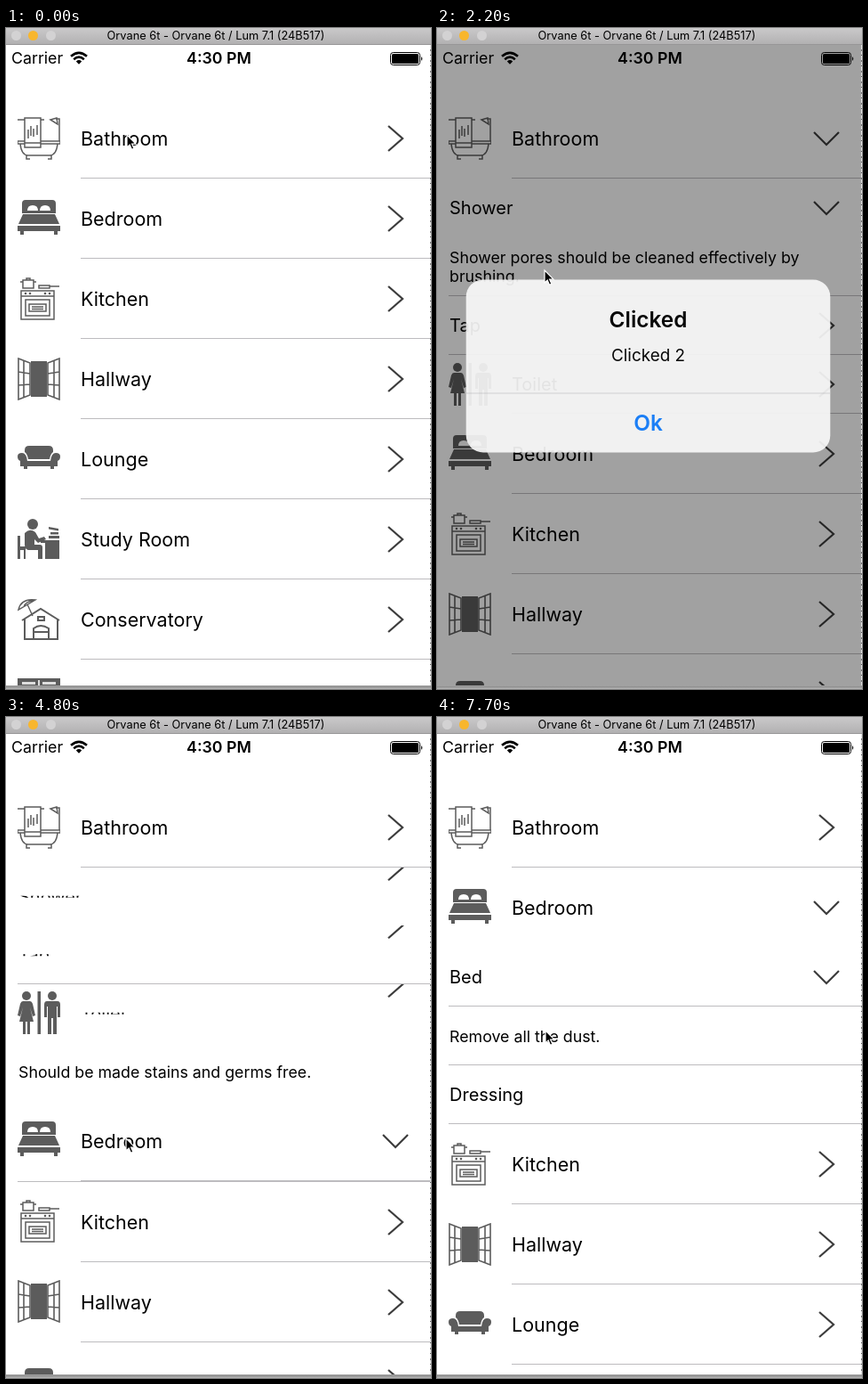
An HTML page for the animation above (8000 ms loop, 478 by 742 pixels).

```html
<!DOCTYPE html>
<html lang="en">
<head>
<meta charset="utf-8">
<title>Room list</title>
<style>
  html, body { margin: 0; width: 100%; height: 100%; overflow: hidden; background: #fff; }
  body { position: relative; font-family: Inter, "Open Sans", sans-serif; color: #000; }
  div, svg { position: absolute; }
  #stage { left: 0; top: 0; width: 478px; height: 742px; overflow: hidden; background: #fff; }
  #bar { left: 0; top: 0; width: 478px; height: 18px; background: linear-gradient(#cac9ca, #b2b1b2); border-bottom: 1px solid #979697; }
  #bar i { position: absolute; top: 2.5px; width: 11px; height: 11px; border-radius: 50%; background: #d3d2d3; }
  #bar div { left: 0; width: 472px; top: 0; line-height: 17px; text-align: center; font-size: 12.8px; white-space: pre; }
  #screen { left: 0; top: 19px; width: 477px; height: 719px; overflow: hidden; }
  #status { left: 0; top: 0; width: 477px; height: 30px; }
  #status div { line-height: 30px; font-size: 17.8px; white-space: pre; }
  .row { left: 0; width: 477px; overflow: hidden; background: #fff; }
  .body { left: 0; top: 50%; width: 477px; }
  .label { left: 84px; top: 50%; transform: translateY(-50%); line-height: 30px; font-size: 21.5px; white-space: pre; }
  .sub .label { font-size: 20px; }
  .flat .label { left: 14px; }
  .note .label { font-size: 17.8px; line-height: 21px; }
  .icon { left: 13px; top: 50%; margin-top: -24.5px; color: #5c5c5c; }
  .chev { left: 422px; top: 50%; margin-top: -16px; }
  .sep { left: 84px; right: 0; bottom: 0; height: 1px; background: #bdbcbf; }
  .flat .sep { left: 13px; }
  #dim { left: 0; top: 0; width: 477px; height: 719px; background: #000; }
  #alert { left: 35.5px; top: 264.5px; width: 403px; height: 191px; border-radius: 19px; overflow: hidden; background: rgba(249, 249, 249, .97); }
  #alert div { left: 0; width: 100%; text-align: center; line-height: 40px; }
  #edge { left: 477px; top: 19px; width: 1px; height: 720px; background: repeating-linear-gradient(#e4e4e4 0 5px, #777 5px 7px, #ddd 7px 11px, #555 11px 12px); }
  #foot { left: 0; top: 738px; width: 478px; height: 4px; background: linear-gradient(#a9a9a9, #8f8f8f 40%, #bcbcbc); }
</style>
</head>
<body>
<div id="stage">
  <div id="screen">
    <div id="list"></div>
    <div id="status">
      <div style="left:6px">Carrier</div>
      <svg style="left:72px;top:7px" width="20" height="16" viewBox="0 0 20 16">
        <g fill="none" stroke="#000" stroke-width="2.6"><path d="M1 5.8Q10 -2 19 5.8M4.2 9.2Q10 4.2 15.8 9.2"/></g>
        <path d="M6.8 11.4Q10 8.8 13.2 11.4L10 14.8Z"/>
      </svg>
      <div style="left:0;width:479px;text-align:center;font-weight:600">4:30 PM</div>
      <svg style="left:431px;top:7px" width="40" height="18" viewBox="0 0 40 18">
        <rect x="1.5" y="1.5" width="33" height="14" rx="3" fill="none" stroke="#000"/>
        <rect x="3" y="3" width="30" height="11" rx="1.5"/>
        <path d="M36 6Q38.5 8.5 36 11Z"/>
      </svg>
    </div>
    <div id="dim"></div>
    <div id="alert">
      <div style="top:24.5px;font-size:24px;font-weight:600">Clicked</div>
      <div style="top:62.5px;font-size:18.6px">Clicked 2</div>
      <div id="ok" style="top:125px;height:66px;line-height:66px;border-top:1px solid #d4d4d6;font-size:24px;font-weight:600;color:#157efb">Ok</div>
    </div>
  </div>
  <div id="bar">
    <i style="left:6px"></i><i style="left:25px;background:#f8b62d"></i><i style="left:45px"></i>
    <div>Orvane 6t - Orvane 6t / Lum 7.1 (24B517)</div>
  </div>
  <div id="edge"></div>
  <div id="foot"></div>
  <svg id="cursor" style="left:0;top:0;overflow:visible" width="12" height="18">
    <path d="M0 0V14L3.2 11.1L5.5 16.4L7.9 15.3L5.6 10.2H10Z" stroke="#fff" stroke-width="1.2"/>
  </svg>
</div>
<script>
const LOOP = 8000, TICK = 100, GROW = 350, END = 9000;
const $ = id => document.getElementById(id);

const line = (d, w = 1.7) => `<path d="${d}" fill="none" stroke="currentColor" stroke-width="${w}"/>`;
const fill = (d, c = 'currentColor') => `<path d="${d}" fill="${c}"/>`;
const dot = (x, y, r) => `<circle cx="${x}" cy="${y}" r="${r}" fill="currentColor"/>`;

const icons = {
  bath: line('M0 27H48V30H0ZM3 30C4 40 7 43 12 43H36C41 43 44 40 45 30M10 43V47H14M38 43V47H34M47 27V2H43M37 3L44 1L45 8ZM0 3H8M26 3H30', 1.5)
    + fill('M8 1H26V34H8Z', '#fff') + line('M8 1H26V34H8ZM12 14V24M15 10V21M18 13V22M22 9V20M8 29H26', 1.5),
  bed: fill('M5 18V7Q5 3 9 3H39Q43 3 43 7V18ZM6 19H42L47 30H1ZM0 32H48V38H45V42H41V38H7V42H3V38H0Z')
    + fill('M11 15Q11 9 17 9Q23 9 23 15ZM25 15Q25 9 31 9Q37 9 37 15ZM9 18H39V19H9Z', '#fff'),
  kitchen: line('M4 15H41V47H4ZM4 21H41M9 25H36V43H9ZM13 30H32V38H13ZM16 33H29M16 35.5H29M6 3H18V12H6ZM3 5H6M18 5H21M10 3V1H14V3M24 9H36V12H24ZM36 10H47', 1.5)
    + dot(9, 18, 1.3) + dot(14, 18, 1.3) + dot(31, 18, 1.3) + dot(36, 18, 1.3),
  window: fill('M15 4H33V44H15Z') + line('M1 1L14 6V42L1 47ZM7 3.5V44.5M1 16L14 18M1 31L14 30M47 1L34 6V42L47 47ZM41 3.5V44.5M47 16L34 18M47 31L34 30', 1.6),
  sofa: fill('M8 16V14Q8 9 13 9H35Q40 9 40 14V16Q37 18 36 24H12Q11 18 8 16ZM0 21Q0 17 5 17Q10 17 11 26H37Q38 17 43 17Q48 17 48 21Q48 25 45 26V32H41V35H37V32H11V35H7V32H3V26Q0 25 0 21Z'),
  study: dot(17, 7, 6) + fill('M8 17Q14 11 20 16L24 23L30 21L32 24L23 28L19 24V30H25Q28 30 28 33V46H23V36H12Q8 35 8 30ZM0 20H3V32H9V46H7V36H3V46H0ZM26 25H47V46H31V28H26ZM35 20H47V23H35ZM37 16H46V18.5H37ZM35 10L46 12V14.5L35 12.5Z'),
  house: line('M5 25L26 12L47 25M8 23V46H45V23M18 46V34Q26 28 35 34V46M18 38H35M23 21H30V25H23Z', 2)
    + line('M1 13Q4 0 20 2ZM7 10Q8 4 20 2M11 7L17 20', 1.4),
  garage: fill('M0 0H48V48H0Z') + fill('M5 4H20V7H5ZM28 4H43V7H28ZM23 2H25V48H23Z', '#ddd'),
  toilet: dot(10, 5, 5) + fill('M6 11H14Q16 11 17 14L20 27L17 28L14 18L18 34H14V48H11V34H9V48H6V34H2L6 18L3 28L0 27L3 14Q4 11 6 11ZM22.5 0H26V48H22.5Z')
    + dot(39, 5, 5) + fill('M33 11H45Q48 11 48 15V29H45V17H44V48H40V30H38V48H34V17H33V29H30V15Q30 11 33 11Z')
};

// open: time span in the list; down: chevron pointing down; bare: separator hidden
const note = (text, open, bare) => ({ text, open, bare, h: 66, css: 'sub flat note', plain: true });
const sub = (text, open, more) => ({ text, open, h: 66, css: 'sub flat', ...more });
const room = (text, icon, more) => ({ text, icon, h: 90, css: '', ...more });

const BATH = [150, 4780], BED = [4780, END];
const rows = [
  room('Bathroom', 'bath', { down: [100, 4700], bare: [1100, 2000] }),
  sub('Shower', BATH, { down: [1100, 3800], bare: [2000, END] }),
  note('Shower pores should be cleaned effectively by\nbrushing.', [1111, 3800]),
  sub('Tap', BATH),
  sub('Toilet', BATH, { icon: 'toilet', css: 'sub', down: [3800, 4700], bare: [3800, END] }),
  note('Should be made stains and germs free.', [3800, 4780], [4700, END]),
  room('Bedroom', 'bed', { down: [4700, END], bare: [6950, END] }),
  sub('Bed', BED, { down: [6950, END] }),
  note('Remove all the dust.', [7000, END]),
  sub('Dressing', BED, { plain: true }),
  room('Kitchen', 'kitchen'),
  room('Hallway', 'window'),
  room('Lounge', 'sofa'),
  room('Study Room', 'study'),
  room('Conservatory', 'house'),
  room('Garage', 'garage')
];

const RIGHT = 'M8 2L24 16L8 30', DOWN = 'M2 9L16 23L30 9';

for (const r of rows) {
  const el = r.el = document.createElement('div');
  el.className = 'row ' + r.css;
  el.innerHTML = `<div class="body" style="height:${r.h}px;margin-top:${-r.h / 2}px">`
    + (r.icon ? `<svg class="icon" width="48" height="48">${icons[r.icon]}</svg>` : '')
    + `<div class="label">${r.text}</div>`
    + (r.plain ? '' : '<svg class="chev" width="32" height="32"><path fill="none" stroke="#3c3c3c" stroke-width="2.2"/></svg>')
    + '</div><div class="sep"></div>';
  r.label = el.querySelector('.label');
  r.chev = el.querySelector('.chev');
  r.sep = el.querySelector('.sep');
  $('list').append(el);
}

// time, x, y of the pointer tip
const path = [
  [0, 136, 120], [500, 136, 120], [700, 124, 222], [850, 124, 222], [1000, 121, 206], [1400, 121, 206],
  [1700, 121, 272], [2250, 121, 272], [2600, 238, 438], [3000, 238, 438], [3400, 128, 402], [3500, 128, 402],
  [3600, 128, 403], [4200, 128, 403], [4600, 135, 473], [5300, 135, 473], [5700, 146, 243], [6000, 134, 352],
  [6100, 134, 352], [6400, 111, 349], [6700, 111, 349], [6800, 108, 306], [7200, 108, 306], [7600, 122, 351],
  [7700, 122, 352], [LOOP, 122, 352]
];

const clamp = v => Math.min(1, Math.max(0, v));
const ease = v => (1 - Math.cos(Math.PI * clamp(v))) / 2;
const within = (span, t) => !!span && t >= span[0] && t < span[1];
const settle = (t, start, tau) => t < start ? 0 : 1 - Math.exp((start - t) / tau);

function drawRows(t) {
  let y = 60;
  for (const r of rows) {
    const [from, to] = r.open || [-GROW, END];
    const h = r.h * (ease((t - from) / GROW) - ease((t - to) / GROW));
    const closing = t >= to && !r.css.includes('note');
    r.el.style.display = h > 0 ? '' : 'none';
    r.el.style.top = y + 'px';
    r.el.style.height = h + 'px';
    r.label.style.clipPath = closing ? 'inset(calc(50% - 1px) 0)' : 'none';
    r.sep.style.display = within(r.bare, t) ? 'none' : '';
    if (r.chev) {
      r.chev.firstChild.setAttribute('d', within(r.down, t) ? DOWN : RIGHT);
      r.chev.style.transform = closing ? `translateY(${-h / 2}px)` : '';
    }
    y += h;
  }
}

function drawAlert(t) {
  const shown = settle(t, 2050, 60);
  const left = t < 2850 ? 1 : clamp(1 - settle(t, 2850, 100) * 1.02);
  $('dim').style.opacity = .4 * shown * left;
  $('alert').style.opacity = Math.min(1, shown * 1.03) * left;
  $('alert').style.transform = `scale(${1 + .2 * (1 - shown)})`;
  $('ok').style.background = within([2800, 2900], t) ? '#e6e6e6' : '';
}

function drawCursor(t) {
  const i = path.findIndex(p => p[0] > t);
  const [a, ax, ay] = path[i - 1], [b, bx, by] = path[i];
  const k = ease((t - a) / (b - a));
  $('cursor').style.transform = `translate(${ax + (bx - ax) * k}px, ${ay + (by - ay) * k}px)`;
}

const start = performance.now();
function frame() {
  const now = Math.max(0, performance.now() - start) % LOOP;
  const t = Math.floor(now / TICK) * TICK;
  drawRows(t);
  drawAlert(t);
  drawCursor(t);
  requestAnimationFrame(frame);
}
frame();
</script>
</body>
</html>
```
